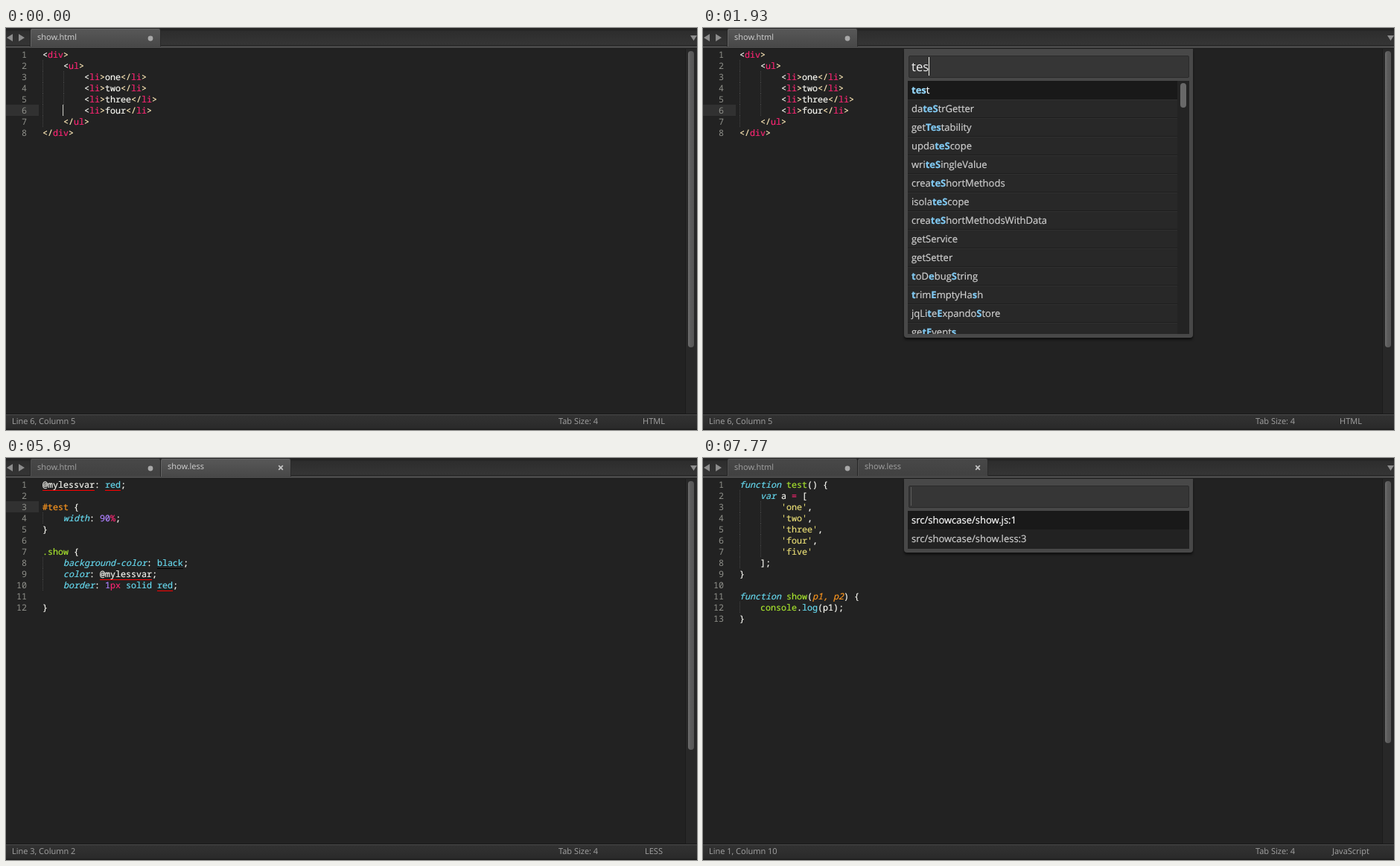
Write an HTML page that moves like this. It is 928 px wide and 540 px high and loops after 8 s.

```html
<!DOCTYPE html>
<html lang="en">
<head>
<meta charset="utf-8">
<title>Editor</title>
<style>
html, body { margin: 0; width: 100%; height: 100%; overflow: hidden; background: #222; }
#stage { position: relative; width: 928px; height: 540px; overflow: hidden; background: #222;
  font: 11px/16px "Open Sans", "Noto Sans", sans-serif; text-rendering: geometricPrecision; }
#stage div, #stage svg { position: absolute; box-sizing: border-box; white-space: pre; }

#bar { left: 0; top: 0; width: 928px; height: 28px;
  background: linear-gradient(#252525 0 3px, #2d2d2d 4px, #353535 23px, #1f1f1f 23px 24px, #484848 24px 27px, #191919 27px); }
.tab { top: 1px; width: 175px; height: 23px; overflow: hidden; color: #a2a2a2;
  background: linear-gradient(#484848, #414141); border-left: 1px solid #262626; border-right: 1px solid #2a2a2a;
  border-radius: 3px 3px 0 0; box-shadow: inset 1px 1px #505050; }
.tab.on { height: 24px; color: #d2d2d2; background: linear-gradient(#585858, #484848); box-shadow: inset 1px 1px #646464; }
.tab div { left: 9px; top: 3px; }
.tab:first-of-type div { top: 4px; }
.tab svg { left: 157px; top: 8px; }

.num { left: 0; width: 28px; text-align: right; color: #8f908a; }
.num, .line { font: 11.667px/15px "Noto Sans Mono", "DejaVu Sans Mono", monospace; height: 15px; }
.line { left: 49px; color: #f8f8f2; }
.line, .item { -webkit-text-stroke: .2px; }
.row { left: 0; width: 44px; height: 15px; background: #313131; }
.guide { width: 1px; height: 15px; background: repeating-linear-gradient(#454545 0 1px, transparent 1px 2px); }
.caret { width: 1px; background: #f8f8f0; }
.r { color: #f92672 } .y { color: #ffe9b8 } .b, .i { color: #66d9ef } .i, .a { font-style: italic }
.g { color: #a6e22e } .o, .a { color: #fd971f } .s { color: #e6db74 } .p { color: #ae81ff }
.u, .v, .w { display: inline-block; height: 15px; box-shadow: inset 0 -1px #f00; }
.v, .w { color: #66d9ef }
.w { box-shadow: inset 0 -1px #000; }

#track { left: 912px; top: 28px; width: 16px; height: 490px; background: #282828; border-left: 1px solid #1b1b1b; }
#thumb { left: 916px; top: 31px; width: 8px; border-radius: 4px; background: linear-gradient(90deg, #707070, #5c5c5c 40%, #565656); }
#status { left: 0; top: 518px; width: 928px; height: 22px; color: #a3a3a3;
  background: linear-gradient(#191919 0 1px, #4a4a4a 1px 2px, #323232 2px, #2a2a2a 20px, #1c1c1c 21px); }
#status div { top: 3px; }

#panel { left: 270px; top: 28px; width: 388px; background: #484848; border-radius: 0 0 4px 4px; box-shadow: 0 3px 3px rgba(0,0,0,.5); }
#field { left: 6px; top: 9px; width: 377px; height: 30px; background: #363636; border: 1px solid #2b2b2b; border-radius: 2px; }
#query { left: 10px; top: 12px; color: #f2f2f2; font-size: 16.7px; line-height: 24px; }
#list { left: 5px; top: 43px; width: 378px; overflow: hidden; background: #232323; }
.item { left: 0; height: 25px; padding-left: 5px; line-height: 23px; font-size: 13px; color: #cfcfcf;
  background: #282828; border-top: 1px solid #303030; border-bottom: 1px solid #1e1e1e; }
.short .item { background: #222; border-color: #222; }
#list .sel { background: #191919; border-color: #191919; color: #fff; }
.item b { color: #80c9f2; }
.item.sel b { color: #96daff; }
.item i { font-style: normal; color: #efbd78; }
#grip { left: 366px; top: 3px; width: 8px; border-radius: 4px; background: #686868; }
</style>
</head>
<body>
<div id="stage"></div>
<script>
const LOOP = 8000;
const tag = (name, end) => (end ? '~y</~' : '<') + `~r${name}~~y>~`;
const pad = n => ' '.repeat(4 * n);

// Text between tildes is styled; its first letter names the style.
const docs = {
  html: {
    kind: 'HTML', bar: 398,
    lines: [tag('div'), pad(1) + tag('ul'),
      ...['one', 'two', 'three', 'four'].map(w => pad(2) + tag('li') + w + tag('li', 1)),
      pad(1) + tag('ul', 1), tag('div', 1)]
  },
  less: {
    kind: 'LESS', bar: 361,
    lines: ['~u@mylessvar~: ~vred~;', '', '~o#test~ {', '    ~iwidth~: ~p90~~r%~;', '}', '', '~g.show~ {',
      '    ~ibackground-color~: ~wblack~;', '    ~icolor~: ~u@mylessvar~;',
      '    ~iborder~: ~p1~~rpx~ ~bsolid~ ~vred~;', '', '}']
  },
  js: {
    kind: 'JavaScript', bar: 352,
    lines: ['~ifunction~ ~gtest~() {', '    ~ivar~ a ~r=~ [',
      ...['one', 'two', 'three', 'four'].map(w => `${pad(2)}~s'${w}'~,`), pad(2) + "~s'five'~",
      '    ];', '}', '', '~ifunction~ ~gshow~(~ap1, p2~) {', '    ~gconsole~.~blog~(p1);', '}']
  }
};

// Matched letters stand between tildes.
const words = s => s.split(' ');
const lists = {
  all: words('CoreAnimateQueueProvider CoreAnimateRunnerProvider ForceReflowProvider applicationDestroyed compose ' +
    'debounceViewValueCommit incOutstandingRequestCount parse parseAndValidate parseLinkUrl renameControl ' +
    'runValidators setOptions unwrapTrustedValue').map(w => '$$' + w),
  t: words('ernary ernary?: est ex hen his. ick imeout oggle rigger rim hrowError hrowNoconcat imeoutRequest').map(w => '~t~' + w),
  te: words('~te~rnary ~te~rnary?: ~te~st ~te~x da~te~StrGetter ge~tTe~stability upda~te~Scope wri~te~SingleValue ' +
    'crea~te~ShortMethods isola~te~Scope crea~te~ShortMethodsWithData ~t~im~e~out ~t~oggl~e~ ~t~rigg~e~r'),
  tes: words('~tes~t da~teS~trGetter get~Tes~tability upda~teS~cope wri~teS~ingleValue crea~teS~hortMethods isola~teS~cope ' +
    'crea~teS~hortMethodsWithData getService getSetter ~t~oD~e~bug~S~tring ~t~rim~E~mptyHa~s~h jqLi~t~e~E~xpando~S~tore ge~tE~vent~s~'),
  test: words('~test~ da~teSt~rGetter get~Test~ability crea~teS~hor~t~Methods crea~teS~hor~t~MethodsWithData ' +
    '~t~oD~e~bug~St~ring jqLi~t~e~E~xpando~St~ore'),
  files: ['src/showcase/show.js:1', 'src/showcase/show.less:3']
};
const grips = { all: 18, t: 18, te: 22, tes: 33, test: 90 };
const caretX = [9, 15, 24, 33, 39];

// [time in ms, what changes]
const steps = [
  [0, { doc: 'html', line: 6, col: 5, own: 1, tab: 0, list: '', query: '', sel: 0, caret: .75 }],
  [130, { caret: 1 }], [420, { caret: .5 }], [550, { caret: 0 }],
  [950, { list: 'all', caret: 1 }],
  [1230, { caret: .6 }], [1370, { caret: .25 }], [1510, { caret: 0 }],
  [1650, { list: 't', query: 't', caret: 1 }],
  [1790, { list: 'te', query: 'te' }],
  [1930, { list: 'tes', query: 'tes' }],
  [2050, { list: 'test', query: 'test' }],
  [2320, { caret: .5 }], [2480, { caret: 0 }],
  [2880, { doc: 'js', line: 1, col: 10, own: 0, list: 'files', query: '', caret: 1 }],
  [3300, { doc: 'less', line: 3, col: 2, sel: 1, caret: .5 }],
  [3430, { caret: 0 }], [3890, { caret: .5 }], [4010, { caret: 1 }],
  [4160, { list: '', own: 1, tab: .35 }], [4300, { tab: .8 }], [4440, { tab: 1 }],
  [4570, { caret: .5 }], [4710, { caret: 0 }],
  [5140, { caret: .5 }], [5270, { caret: 1 }], [5550, { caret: .5 }], [5690, { caret: 0 }],
  [5840, { list: 'all', sel: 0, caret: 1 }],
  [6110, { caret: .6 }], [6250, { caret: .25 }], [6400, { caret: 0 }],
  [6560, { list: 't', query: 't', sel: 2, caret: 1 }],
  [6680, { list: 'te', query: 'te' }],
  [6830, { list: 'test', query: 'test', sel: 0 }],
  [7250, { doc: 'js', line: 1, col: 10, own: 0, list: 'files', query: '', caret: 1 }],
  [7770, { caret: .2 }]
];

const esc = s => s.replace(/&/g, '&amp;').replace(/</g, '&lt;');
const styled = (s, wrap) => s.split('~').map((p, i) => i % 2 ? wrap(p) : esc(p)).join('');
const box = (attr, style, inner = '') => `<div ${attr} style="${style}">${inner}</div>`;
const caretAt = (x, y, h, o) => box('class="caret"', `left:${x}px;top:${y}px;height:${h}px;opacity:${o}`);

function tabs(s) {
  const tab = (x, w, name, on, mark) => box(`class="tab${on ? ' on' : ''}"`, `left:${x}px;width:${w}px`,
    `<div>${name}</div><svg width="10" height="10">${mark}</svg>`);
  const dot = '<circle cx="4" cy="5" r="3.4" fill="#a8a8a8"/>';
  const cross = '<path d="M1.2 1.2L6.8 6.8M6.8 1.2L1.2 6.8" stroke="#c4c4c4" stroke-width="1.8"/>';
  const arrows = '<svg width="928" height="28" style="left:0;top:0"><path fill="#8c8c8c" ' +
    'd="M9 8V18L1 13ZM17 8V18L25 13ZM919 10H928L923.5 17Z"/></svg>';
  return box('id="bar"', '', arrows + tab(32, 176, 'show.html', s.own && !s.tab, dot) +
    (s.tab ? tab(207, 176 * s.tab, 'show.less', s.own, cross) : ''));
}

function code(s) {
  let out = s.own ? box('class="row"', `top:${13 + 15 * s.line}px`) : '';
  docs[s.doc].lines.forEach((text, i) => {
    const y = 28 + 15 * i;
    const top = `top:${y + 1}px`;
    const depth = text.match(/^ */)[0].length / 4;
    for (let d = 0; d < depth; d++) out += box('class="guide"', `left:${49 + 28 * d}px;top:${y}px`);
    out += box('class="num"', top, i + 1) +
      box('class="line"', top, styled(text, p => `<span class="${p[0]}">${esc(p.slice(1))}</span>`));
  });
  if (!s.list) out += caretAt(48 + 7 * (s.col - 1), 13 + 15 * s.line, 15, s.caret);
  return out;
}

function panel(s) {
  if (!s.list) return '';
  const short = s.list === 'files';
  const height = short ? 51 : 340;
  const items = lists[s.list].map((text, i) => box(`class="item${i === s.sel ? ' sel' : ''}"`,
    `top:${25 * i}px;width:${short ? 378 : 362}px`,
    styled(text, p => `<b>${p}</b>`).replace('$$', () => '<i>$$</i>'))).join('');
  const grip = short ? '' : box('id="grip"', `height:${grips[s.list]}px`);
  return box('id="panel"', `height:${height + 48}px`,
    '<div id="field"></div>' + box('id="query"', '', s.query) +
    caretAt(caretX[s.query.length], 11, 25, s.caret) +
    box(`id="list" class="${short ? 'short' : ''}"`, `height:${height}px`, items + grip));
}

function status(s) {
  return box('id="status"', '', box('', 'left:8px', `Line ${s.line}, Column ${s.col}`) +
    box('', 'left:742px', 'Tab Size: 4') +
    box('', 'left:830px;width:80px;text-align:center', docs[s.doc].kind));
}

const stage = document.getElementById('stage');
let shown = -1;

function draw() {
  const t = performance.now() % LOOP;
  const n = steps.filter(([at]) => at <= t).length;
  if (n !== shown) {
    shown = n;
    const s = Object.assign({}, ...steps.slice(0, n).map(([, change]) => change));
    stage.innerHTML = code(s) + '<div id="track"></div>' +
      box('id="thumb"', `height:${docs[s.doc].bar}px`) + tabs(s) + status(s) + panel(s);
  }
  requestAnimationFrame(draw);
}
draw();
</script>
</body>
</html>
```
